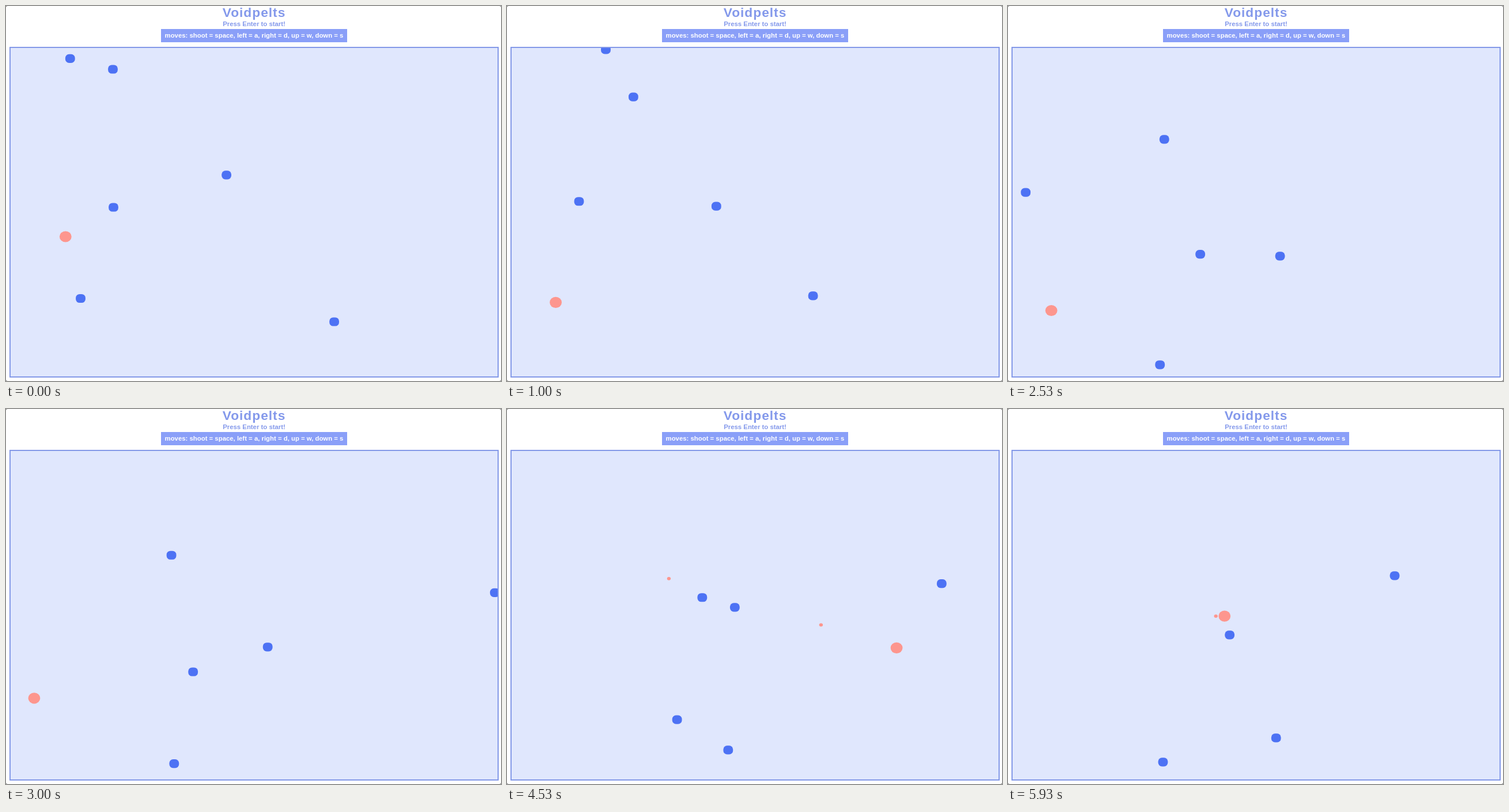
Write an HTML page with a canvas that moves like this. It is 859 px wide and 652 px high and loops after 5.99 s.

```html
<!DOCTYPE html>
<html lang="en">
<head>
<meta charset="utf-8">
<title>Voidpelts</title>
<style>
  html, body { margin: 0; width: 100%; height: 100%; overflow: hidden; background: #777; }
  main {
    position: relative; width: 859px; height: 652px; overflow: hidden;
    background: #fff; border-radius: 3px;
    font: bold 11.37px/14px "Liberation Sans", Arial, sans-serif;
    color: #8499eb; text-align: center; white-space: nowrap;
  }
  h1, p, canvas { position: absolute; margin: 0; }
  h1 { left: 0; width: 861px; top: -1px; font-size: 22.74px; line-height: 25px; letter-spacing: 1px; }
  .start { left: 0; width: 861px; top: 24px; }
  .keys { left: 269px; top: 40px; width: 323px; height: 23px; line-height: 22px; background: #8a9ff8; color: #fff; }
  canvas { left: 6px; top: 71px; border: 2px solid #8499e8; background: #e0e7fd; }
</style>
</head>
<body>
<main>
  <h1>Voidpelts</h1>
  <p class="start">Press Enter to start!</p>
  <p class="keys">moves: shoot = space, left = a, right = d, up = w, down = s</p>
  <canvas width="845" height="571"></canvas>
</main>
<script>
const ctx = document.querySelector('canvas').getContext('2d');
const LEFT = 8, TOP = 73, W = 846.3, H = 571.6;
const LOOP = 5990, STEP = 200 / 3;
const BLUE = '#4d72f4', CORAL = '#fd968e';

// One unit of speed, in px/s along each axis
const UX = 62.5, UY = 57.2;
const SHOT_POWER = 5.4, HIT_RADIUS = 11;

const wrap = (v, min, size) => min + ((v - min) % size + size) % size;
const place = (x, y) => ({ x: wrap(x, LEFT, W), y: wrap(y, TOP, H) });

// Every rock drifts at one unit of speed; only its heading differs
function makeRock(x, y, degrees) {
  const angle = degrees * Math.PI / 180;
  const vx = UX * Math.cos(angle), vy = UY * Math.sin(angle);
  return { vx, vy, end: Infinity, at: t => place(x + vx * t, y + vy * t) };
}

const rocks = [
  makeRock(111.3, 91.4, -15.7),
  makeRock(186.5, 350, 190.3),
  makeRock(185.5, 110, 57.2),
  makeRock(382.6, 293.8, 108),
  makeRock(129.5, 508.5, 112),
  makeRock(569.6, 549, 232)
];

// Each key press adds one unit of speed in its direction
const headings = { a: [-1, 0], d: [1, 0], w: [0, -1], s: [0, 1] };
const presses = {
  a: [0.7, 2.58, 3.5, 3.58, 5.14],
  d: [1.15],
  w: [1.4, 1.6, 1.78],
  s: [5.495]
};

function shipAt(t) {
  let vx = 0, vy = 2 * UY, x = 103.3, y = 401 + vy * t;
  for (const key in presses) {
    const [dx, dy] = headings[key];
    for (const at of presses[key].filter(p => p <= t)) {
      vx += dx * UX;
      vy += dy * UY;
      x += dx * UX * (t - at);
      y += dy * UY * (t - at);
    }
  }
  return { ...place(x, y), vx, vy };
}

// Seconds from firing until shot and rock touch
function timeToHit(shot, rock) {
  const p = rock.at(shot.start);
  const dx = p.x - shot.x, dy = p.y - shot.y;
  const vx = shot.vx - rock.vx, vy = shot.vy - rock.vy;
  const speed = Math.hypot(vx, vy);
  const along = (dx * vx + dy * vy) / speed;
  const miss = Math.abs(dx * vy - dy * vx) / speed;
  if (along < 0 || miss > HIT_RADIUS) return Infinity;
  return (along - Math.sqrt(HIT_RADIUS ** 2 - miss ** 2)) / speed;
}

function fire(start) {
  const ship = shipAt(start);
  const shot = {
    start, x: ship.x, y: ship.y, end: Infinity,
    vx: ship.vx * SHOT_POWER, vy: ship.vy * SHOT_POWER
  };
  for (const rock of rocks) {
    if (rock.end < start) continue;
    const hit = start + timeToHit(shot, rock);
    if (hit < Infinity) shot.end = rock.end = hit;
  }
  return shot;
}

const shots = [0.6, 4.05, 4.37, 4.568, 4.765, 5, 5.869].map(fire);

function oval(x, y, rx, ry) {
  ctx.fillStyle = CORAL;
  ctx.beginPath();
  ctx.ellipse(x, y, rx, ry, 0, 0, 2 * Math.PI);
  ctx.fill();
}

function pebble({ x, y }) {
  ctx.fillStyle = BLUE;
  ctx.beginPath();
  ctx.roundRect(x - 8.4, y - 7.6, 16.8, 15.2, 6.6);
  ctx.fill();
}

function draw(t) {
  ctx.setTransform(1, 0, 0, 1, 0, 0);
  ctx.clearRect(0, 0, 845, 571);
  ctx.translate(-LEFT, -TOP);
  for (const rock of rocks) if (t < rock.end) pebble(rock.at(t));
  for (const s of shots) {
    const age = t - s.start;
    if (age >= 0 && t < s.end) oval(s.x + s.vx * age, s.y + s.vy * age, 3.2, 2.9);
  }
  const ship = shipAt(t);
  oval(ship.x, ship.y, 10.4, 9.6);
}

// The game runs a little slow once the firing starts
const gameTime = t => t - 0.033 * Math.max(0, t - 4.4);

const origin = performance.now();
function tick() {
  const ms = (performance.now() - origin) % LOOP;
  draw(gameTime(Math.floor((ms + 3.4) / STEP) * STEP / 1000));
  requestAnimationFrame(tick);
}
tick();
</script>
</body>
</html>
```
